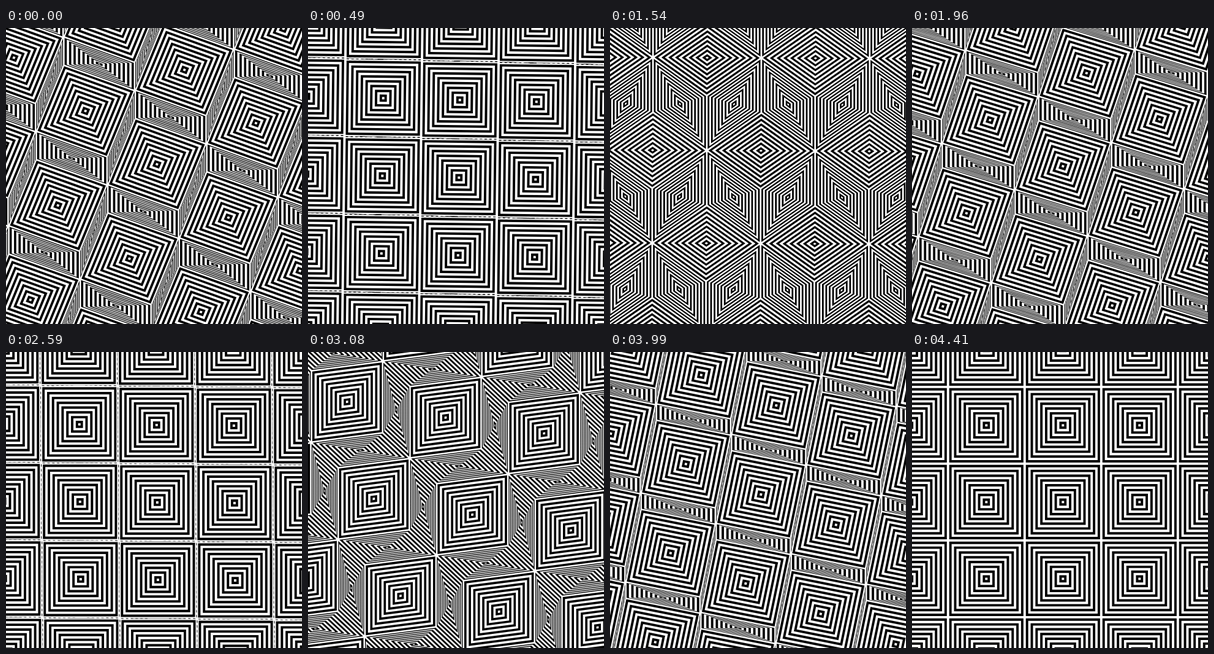
Write an HTML page with a canvas that moves like this. It is 483x482 px and loops after 4480 ms.

```html
<!DOCTYPE html>
<html lang="en">
<head>
<meta charset="utf-8">
<title>Cube tiling</title>
<style>
  html, body { margin: 0; width: 100%; height: 100%; overflow: hidden; background: #fff; }
  canvas { display: block; }
</style>
</head>
<body>
<canvas width="483" height="482"></canvas>
<script>
const ctx = document.querySelector('canvas').getContext('2d');
const LOOP = 4480, STEP = 70;
const TURN = 1905, MOVE = 1809, START = 641; // one turn of the cubes, its moving part, its offset
const SIZE = 125, CX = 246.3, CY = 244.4, REACH = 5;

// Nested squares on a face of unit side
const rings = new Path2D();
for (let k = 0; k < 16; k++) {
  const r = (k + 0.5) / 32;
  rings.rect(-r, -r, 2 * r, 2 * r);
}

const ease = x => x < 0.5 ? (2 * x) ** 1.5 / 2 : 1 - (2 - 2 * x) ** 1.5 / 2;

// Projected cube axes, each pointing towards the viewer
function cubeAxes(angle) {
  const yaw = angle < Math.PI / 4;
  const a = yaw ? angle : Math.PI / 2 - angle;
  const s = Math.sin(a), c = Math.cos(a);
  const axes = yaw
    ? [[-c, s * s], [0, -c], [s, s * c]]
    : [[c, s * c], [-s, c * c], [0, -s]];
  return axes.map(([x, y]) => [x * SIZE, y * SIZE]);
}

function drawFace(p, q, x, y) {
  ctx.setTransform(p[0], p[1], q[0], q[1], x, y);
  ctx.fill(rings, 'evenodd');
}

function draw(time) {
  const phase = (time - START + TURN) % TURN;
  const [u, v, w] = cubeAxes(ease(Math.min(phase / MOVE, 1)) * Math.PI / 2);
  ctx.resetTransform();
  ctx.fillStyle = '#fff';
  ctx.fillRect(0, 0, 483, 482);
  ctx.fillStyle = '#000';
  for (let i = -REACH; i <= REACH; i++) {
    for (let j = -REACH; j <= REACH; j++) {
      const x = CX + i * (u[0] - w[0]) + j * (v[0] - w[0]);
      const y = CY + i * (u[1] - w[1]) + j * (v[1] - w[1]);
      for (const [p, q, n] of [[u, v, w], [v, w, u], [w, u, v]]) {
        drawFace(p, q, x + n[0] / 2, y + n[1] / 2);
      }
    }
  }
}

function tick() {
  draw(Math.floor(performance.now() % LOOP / STEP) * STEP);
  requestAnimationFrame(tick);
}
tick();
</script>
</body>
</html>
```
